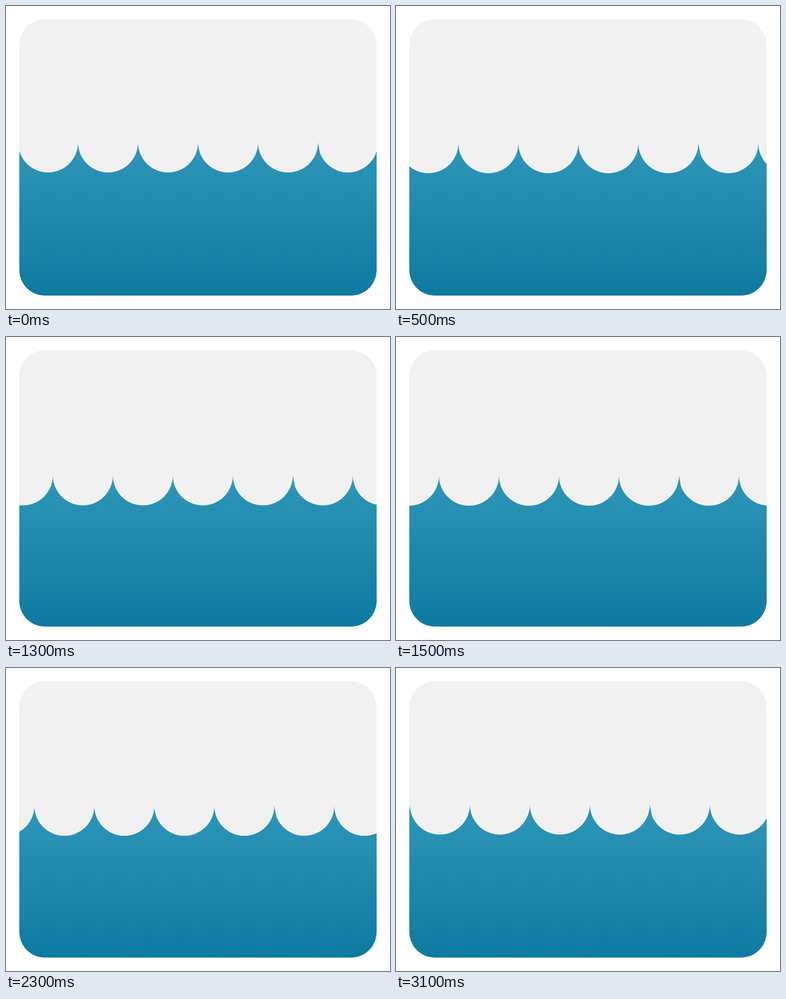
Animation, 745 px wide and 587 px high, one loop 3200 ms. Source, as an HTML page with a canvas:

```html
<!DOCTYPE html>
<html lang="en">
<head>
<meta charset="utf-8">
<title>Waves</title>
<style>
html, body { margin: 0; width: 100%; height: 100%; overflow: hidden; background: #fff; }
canvas { display: block; width: 745px; height: 587px; }
</style>
</head>
<body>
<canvas id="stage"></canvas>
<script>
const W = 745, H = 587;
const LOOP = 3200, STEP = 100;
const CARD = { x: 25.8, y: 25.8, w: 693.3, h: 535.3, r: 50 };
const PITCH = 116.4, R = PITCH / 2;
const START = { x: 605.4, y: 264.3 };
const MIDDLE = { x: 545.2, y: 268.9 };
const END = { x: START.x - PITCH, y: START.y };
const KINK = 0.363; // angle cut off the arc right of the kinked crest

const canvas = document.getElementById('stage');
const ratio = window.devicePixelRatio || 1;
canvas.width = W * ratio;
canvas.height = H * ratio;
const ctx = canvas.getContext('2d');
ctx.scale(ratio, ratio);

const water = ctx.createLinearGradient(0, 264, 0, 561);
water.addColorStop(0, '#2e97b8');
water.addColorStop(1, '#0f7aa0');

const mix = (a, b, k) => a + (b - a) * k;

// Position of the kinked crest: two linear legs, down then up
function crestAt(time) {
  const k = time / LOOP * 2;
  const [a, b] = k < 1 ? [START, MIDDLE] : [MIDDLE, END];
  return { x: mix(a.x, b.x, k % 1), y: mix(a.y, b.y, k % 1) };
}

function cardPath() {
  const { x, y, w, h, r } = CARD;
  ctx.beginPath();
  ctx.moveTo(x + r, y);
  ctx.arcTo(x + w, y, x + w, y + h, r);
  ctx.arcTo(x + w, y + h, x, y + h, r);
  ctx.arcTo(x, y + h, x, y, r);
  ctx.arcTo(x, y, x + w, y, r);
  ctx.closePath();
}

function wavePath(crest) {
  ctx.beginPath();
  ctx.moveTo(crest.x - 6 * PITCH, crest.y);
  for (let i = -6; i < 3; i++) {
    const cx = crest.x + i * PITCH + R;
    ctx.lineTo(cx - R, crest.y);
    ctx.arc(cx, crest.y, R, Math.PI - (i === 0 ? KINK : 0), 0, true);
  }
  ctx.lineTo(crest.x + 3 * PITCH, H);
  ctx.lineTo(crest.x - 6 * PITCH, H);
  ctx.closePath();
}

function draw(time) {
  ctx.clearRect(0, 0, W, H);
  ctx.save();
  cardPath();
  ctx.fillStyle = '#f1f1f1';
  ctx.fill();
  ctx.clip();
  wavePath(crestAt(time));
  ctx.fillStyle = water;
  ctx.fill();
  ctx.restore();
}

const began = performance.now();
function tick() {
  const time = (performance.now() - began) % LOOP;
  draw(Math.floor(time / STEP) * STEP);
  requestAnimationFrame(tick);
}
tick();
</script>
</body>
</html>
```
